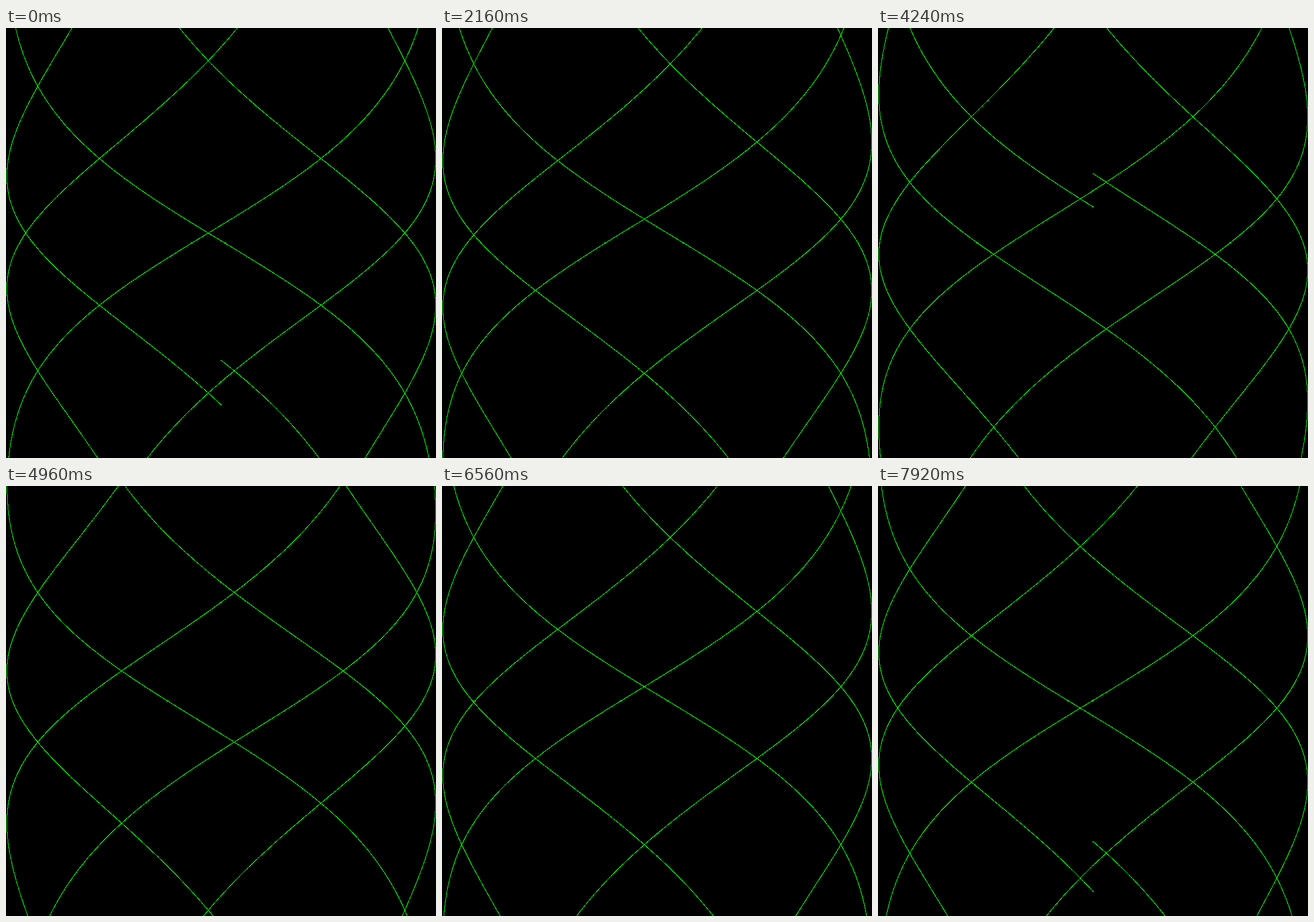
Write an HTML page with a canvas that moves like this. It is 748x748 px and loops after 8 s.

```html
<!DOCTYPE html>
<html lang="en">
<head>
<meta charset="utf-8">
<title>Tangent curve</title>
<style>
  html, body { margin: 0; height: 100%; overflow: hidden; background: #000; }
  canvas { display: block; width: 748px; height: 748px; image-rendering: pixelated; }
</style>
</head>
<body>
<canvas id="stage" width="747" height="747"></canvas>
<script>
const HALF = 373, SIDE = 2 * HALF + 1;
const CYCLES = 5, STEP = 0.001, FREQ = 0.6046602879796196;
const FRAMES = 100, DELAY = 80;
const BLACK = 0xff000000, GREEN = 0xff00ff00;

const ctx = document.getElementById("stage").getContext("2d");
const image = ctx.createImageData(SIDE, SIDE);
const pixels = new Uint32Array(image.data.buffer);

// Truncation towards zero gives the slight flat spot on the centre lines.
const toPixel = v => HALF + Math.trunc(v * HALF + 0.5);

function draw(frame) {
  const phase = 0.5 + 2 * frame;
  pixels.fill(BLACK);
  for (let t = 0; t < CYCLES * 2 * Math.PI; t += STEP) {
    const x = toPixel(Math.sin(t));
    const y = toPixel(Math.tan(t * FREQ + phase));
    if (y >= 0 && y < SIDE) pixels[y * SIDE + x] = GREEN;
  }
  ctx.putImageData(image, 0, 0);
}

const start = performance.now();
let shown = -1;

function tick() {
  const frame = Math.floor((performance.now() - start) / DELAY) % FRAMES;
  if (frame !== shown) draw(shown = frame);
  requestAnimationFrame(tick);
}
tick();
</script>
</body>
</html>
```
